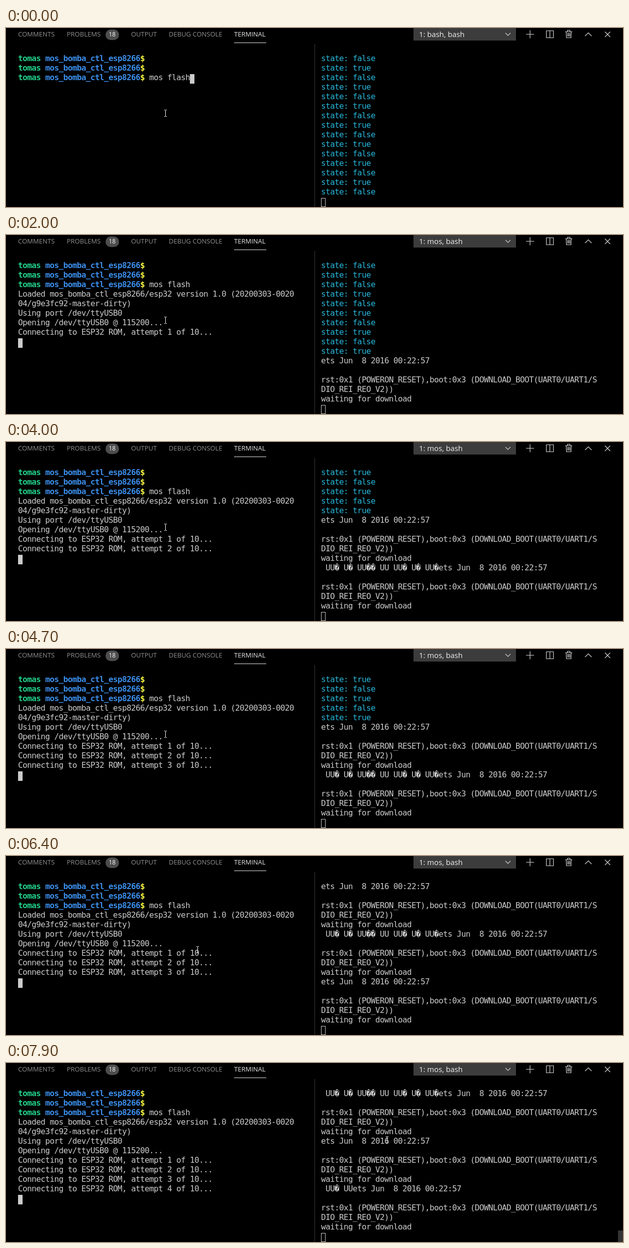
These frames come from a looping animation (1228 px wide and 357 px high, 8 s). An HTML page with a canvas:

```html
<!DOCTYPE html>
<html lang="en">
<head>
<meta charset="utf-8">
<title>Terminal</title>
<style>
html, body { margin: 0; width: 100%; height: 100%; overflow: hidden; background: #000; }
canvas { display: block; }
</style>
</head>
<body>
<canvas id="stage" width="1228" height="357"></canvas>
<script>
const c = document.getElementById('stage').getContext('2d');
const LOOP = 8000, CELL = 9, ROW = 19, TOP = 54, LEFT = 24, RIGHT = 627;
const MONO = '16px "DejaVu Sans Mono", monospace';
const UI = '"Open Sans", "Noto Sans", sans-serif';
const TEXT = '#cccccc', CYAN = '#29b8db';

const USER = 'tomas', DIR = 'mos_bomba_ctl_esp8266';
const output = [
  'Loaded mos_bomba_ctl_esp8266/esp32 version 1.0 (20200303-0020',
  '04/g9e3fc92-master-dirty)',
  'Using port /dev/ttyUSB0',
  'Opening /dev/ttyUSB0 @ 115200...',
  ...[1, 2, 3, 4].map(n => `Connecting to ESP32 ROM, attempt ${n} of 10...`)
];

const boot = noise => [
  noise + 'ets Jun  8 2016 00:22:57', '',
  'rst:0x1 (POWERON_RESET),boot:0x3 (DOWNLOAD_BOOT(UART0/UART1/S',
  'DIO_REI_REO_V2))', 'waiting for download'
];
const log = [
  ...Array.from({ length: 16 }, (_, i) => 'state: ' + (i % 2 === 1)),
  ...boot(''), ...boot(' UU\ufffd U\ufffd UU\ufffd\ufffd UU UU\ufffd U\ufffd UU\ufffd'),
  ...boot(''), ...boot(' UU\ufffd UU')
];

// Each entry: [start time, value]
const logCount = [[0, 15], [100, 16], [2000, 21], [4000, 26], [6000, 28], [6100, 31], [7900, 36]];
const outCount = [[0, 0], [800, 5], [2700, 6], [4700, 7], [6700, 8]];
// Each entry: [time, x, y]
const mousePath = [[0, 317, 170], [6300, 317, 170], [6400, 381, 187], [6500, 381, 187],
  [6800, 570, 152], [7000, 722, 122], [7200, 762, 137], [7500, 761, 146], [7900, 758, 153], [8000, 758, 153]];

const valueAt = (steps, t) => steps.filter(s => s[0] <= t).pop()[1];

function mouseAt(t) {
  const i = mousePath.findIndex(p => p[0] > t);
  const [t0, x0, y0] = mousePath[i - 1], [t1, x1, y1] = mousePath[i];
  const k = (t - t0) / (t1 - t0);
  return [Math.round(x0 + (x1 - x0) * k), Math.round(y0 + (y1 - y0) * k)];
}

function rect(x, y, w, h, color) {
  c.fillStyle = color;
  c.fillRect(x, y, w, h);
}

function label(text, x, y, size, color) {
  c.font = `${size}px ${UI}`;
  c.fillStyle = color;
  c.fillText(text, x, y);
}

// Terminal text sits on a fixed grid of cells
function cells(text, x, row, color, bold) {
  c.font = (bold ? 'bold ' : '') + MONO;
  c.fillStyle = color;
  [...text].forEach((ch, i) => c.fillText(ch, x + i * CELL, TOP + 12 + row * ROW));
}

function icon(path, width = 1.2) {
  c.strokeStyle = '#d4d4d4';
  c.lineWidth = width;
  c.stroke(new Path2D(path));
}

function drawHeader(title) {
  const grey = '#909090';
  label('COMMENTS', 24, 17, 13, grey);
  label('PROBLEMS', 121, 17, 13, grey);
  label('OUTPUT', 249, 17, 13, grey);
  label('DEBUG CONSOLE', 324, 17, 13, grey);
  label('TERMINAL', 454, 17, 13, '#e7e7e7');
  rect(454, 29, 64, 1, '#e7e7e7');

  c.fillStyle = '#4d4d4d';
  c.beginPath();
  c.roundRect(198, 3, 27, 21, 10.5);
  c.fill();
  label('18', 204.5, 17, 12, '#fff');

  rect(811, 0, 204, 25, '#3c3c3c');
  label(title, 822, 18, 14.8, '#f0f0f0');
  icon('M994 10l5 5l5-5');
  icon('M1035 12.5h16M1043 4.5v16');
  icon('M1075.5 5.5h14v14h-14zM1082.5 5.5v14');
  icon('M1113 7.5h14M1117.5 7v-2.5h5v2.5M1115 7.5l.5 12h9l.5-12M1118 10v7M1120.2 10v7M1122.5 10v7');
  icon('M1152.5 16l6.5-6.5l6.5 6.5');
  icon('M1192 7.5l10.5 10.5M1202.5 7.5l-10.5 10.5');
}

function drawShell(t) {
  for (let row = 0; row < 3; row++) {
    cells(USER, LEFT, row, '#23d18b', true);
    cells(DIR, LEFT + 6 * CELL, row, '#3b8eea', true);
    cells('$', LEFT + 27 * CELL, row, '#f5f543', true);
  }
  cells('mos flash', LEFT + 29 * CELL, 2, TEXT);
  const n = valueAt(outCount, t);
  output.slice(0, n).forEach((line, i) => cells(line, LEFT, 3 + i, TEXT));
  const typing = t < 700;
  rect(LEFT + (typing ? 38 * CELL : 0), TOP + (typing ? 2 : 3 + n) * ROW, CELL, ROW, TEXT);
}

function drawLog(t) {
  const end = valueAt(logCount, t);
  log.slice(end - 15, end).forEach((line, row) =>
    cells(line, RIGHT, row, line.startsWith('state') ? CYAN : TEXT));
  c.strokeStyle = TEXT;
  c.lineWidth = 1;
  c.strokeRect(RIGHT + .5, 339.5, 8, 17);
}

function drawMouse(x, y) {
  rect(x, y - 6, 1, 12, '#fff');
  for (const edge of [y - 7, y + 6]) {
    rect(x - 2, edge, 2, 1, '#fff');
    rect(x + 1, edge, 2, 1, '#fff');
  }
}

function frame(now) {
  const t = Math.floor(now % LOOP / 100) * 100;
  const [x, y] = mouseAt(t);
  rect(0, 0, 1228, 357, '#000');
  drawHeader(t < 800 ? '1: bash, bash' : '1: mos, bash');
  rect(614, 32, 1, 325, '#3a3a3a');
  drawShell(t);
  drawLog(t);
  if (x > 614) rect(1218, 334, 10, 23, '#333');
  drawMouse(x, y);
}

const start = performance.now();
function tick() {
  frame(performance.now() - start);
  requestAnimationFrame(tick);
}
tick();
</script>
</body>
</html>
```
